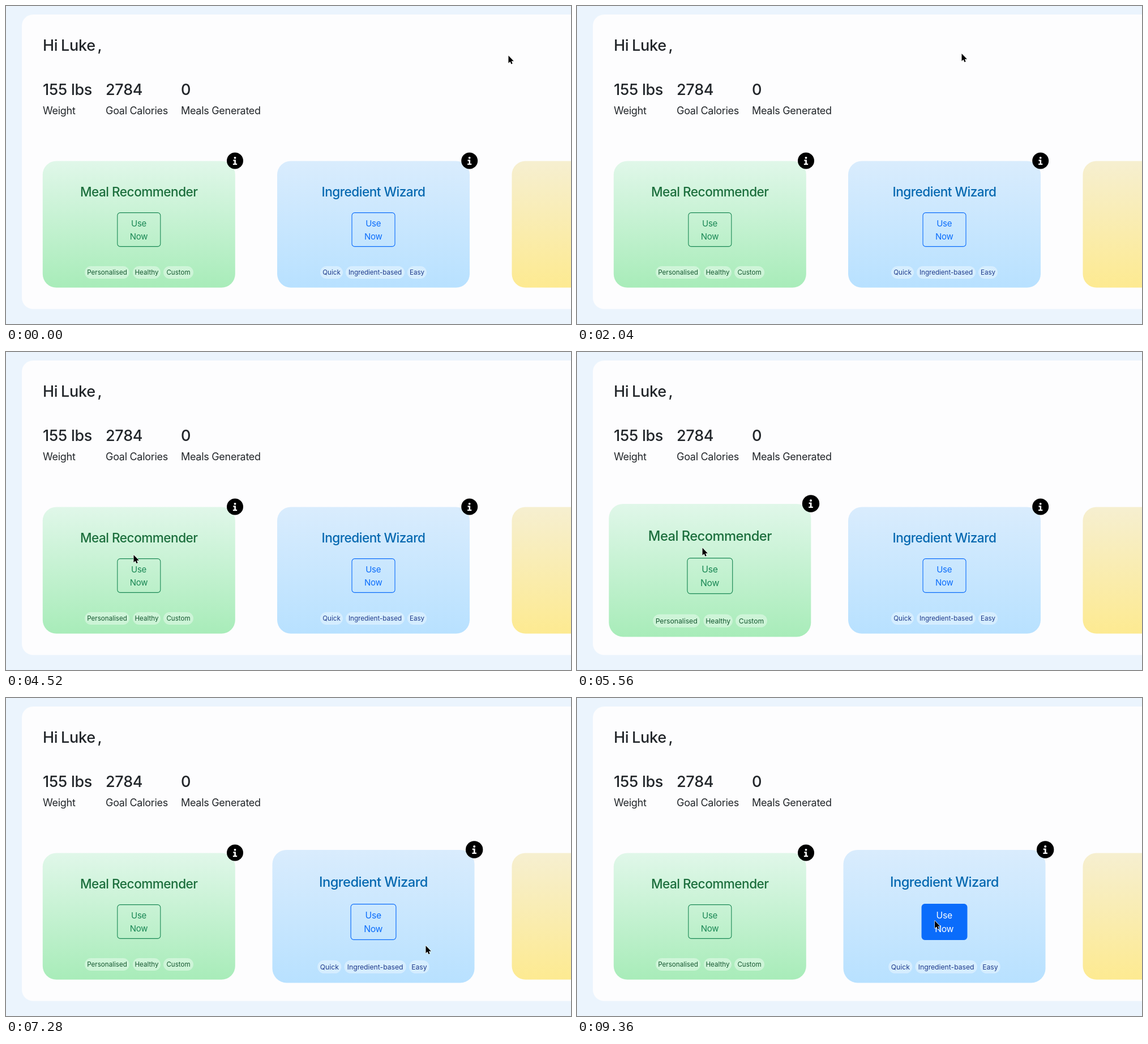
These frames come from a looping animation (998x561 px, 9.4 s). An HTML page:

```html
<!DOCTYPE html>
<html lang="en">
<head>
<meta charset="utf-8">
<title>Meal dashboard</title>
<style>
  html, body { margin: 0; width: 100%; height: 100%; overflow: hidden; background: #ebf4fd; }
  svg { display: block; width: 100%; height: 100%; }
  text { font-family: Inter, "Open Sans", sans-serif; fill: #212529; letter-spacing: -.02em; }
  .big { font-size: 27px; font-weight: 500; letter-spacing: -.01em; }
  .label { font-size: 18px; letter-spacing: -.016em; }
  .mid { text-anchor: middle; }
  .title { font-size: 22.6px; font-weight: 500; letter-spacing: -.023em; }
  .btn { font-size: 15px; }
  .tag { font-size: 11.6px; letter-spacing: 0; }
</style>
</head>
<body>
<svg id="stage" viewBox="0 0 998 561" xmlns="http://www.w3.org/2000/svg"></svg>
<script>
const LOOP = 9400, STEP = 40;
const stage = document.getElementById('stage');

const text = (x, y, cls, str, fill = '#212529') =>
  `<text x="${x}" y="${y}" class="${cls}" style="fill:${fill}">${str}</text>`;

const gradient = (id, top, bottom) =>
  `<linearGradient id="${id}" x1="0" y1="0" x2="0" y2="1">
    <stop stop-color="${top}"/><stop offset="1" stop-color="${bottom}"/></linearGradient>`;

const panel = (x, fill) =>
  `<rect x="${x}" y="273.5" width="340" height="223.3" rx="24" fill="url(#${fill})"/>`;

const infoIcon = x => `<g transform="translate(${x} 273)">
  <circle r="14.5"/>
  <g fill="#fff"><circle cy="-5.2" r="1.9"/>
  <path d="M-3.2-1.7H1.4V5.1H3.6V7.3H-3.6V5.1H-1.2V.5H-3.2Z"/></g></g>`;

const tag = ([str, left, right], color) =>
  `<rect x="${left}" y="459" width="${right - left}" height="22" rx="11" fill="#fff" fill-opacity=".38"/>` +
  text((left + right) / 2, 474.3, 'tag mid', str, color);

function card(c) {
  const cx = c.x + 170;
  return `<g id="${c.id}">${panel(c.x, c.id + 'Fill')}
    ${text(cx, 335.6, 'title mid', c.title, c.titleColor)}
    <rect class="face" x="${cx - 38}" y="364.6" width="76" height="59.8" rx="5"
      fill="${c.btn}" fill-opacity="0" stroke="${c.btn}" stroke-width="1.1"/>
    ${text(cx - .3, 389, 'btn mid', 'Use', c.btn)}
    ${text(cx - .3, 412, 'btn mid', 'Now', c.btn)}
    ${c.tags.map(t => tag(t, c.tagColor)).join('')}
    ${infoIcon(c.x + 339.7)}</g>`;
}

const green = {
  id: 'green', x: 64.8, title: 'Meal Recommender', titleColor: '#1b6e3c',
  btn: '#198754', tagColor: '#14572f',
  tags: [['Personalised', 139, 218], ['Healthy', 224, 273], ['Custom', 278, 331]]
};
const blue = {
  id: 'blue', x: 479, title: 'Ingredient Wizard', titleColor: '#0568b0',
  btn: '#0a6cfb', tagColor: '#1e3a8a',
  tags: [['Quick', 555, 595], ['Ingredient-based', 600, 704], ['Easy', 709, 743]]
};

stage.innerHTML = `<defs>
    ${gradient('greenFill', '#e0f7e9', '#a8ecb9')}
    ${gradient('blueFill', '#d9ecfd', '#b8e1ff')}
    ${gradient('yellowFill', '#f6efd0', '#fdea91')}
  </defs>
  <rect width="998" height="561" fill="#ebf4fd"/>
  <rect x="28" y="15" width="1100" height="519.5" rx="20" fill="#fdfdfe"/>
  ${text(65, 78.5, 'big', 'Hi')}
  ${text(97, 78.5, 'big', 'Luke')}
  ${text(161.5, 78.5, 'big', ',')}
  ${[[65, '155 lbs', 'Weight'], [176, '2784', 'Goal Calories'], [309, '0', 'Meals Generated']]
    .map(([x, n, l]) => text(x, 156.5, 'big', n) + text(x, 191, 'label', l)).join('')}
  ${panel(893.5, 'yellowFill')}
  ${card(green)}${card(blue)}
  <path id="cursor" d="M0 0V13.2L3 10.5L5 15L7.2 14L5.3 9.7H9.4Z"
    stroke="#fff" stroke-width="1.2" stroke-linejoin="round" paint-order="stroke"/>`;

// Pointer stops: time, x, y
const path = [
  [80, 887.5, 87.5], [960, 679.5, 84], [4180, 679.5, 84], [4520, 225.5, 358],
  [4720, 215, 345], [5500, 215, 345], [6200, 529.5, 373], [6640, 570, 448],
  [7280, 741.5, 437], [7900, 741.5, 437], [8700, 632, 393]
];

const clamp = v => Math.max(0, Math.min(1, v));
const smooth = k => k * k * (3 - 2 * k);
const settle = k => 1 - (1 - k) ** 2.2;
const ramp = (t, start, length) => settle(clamp((t - start) / length));

function pointer(t) {
  let i = 0;
  while (i < path.length - 2 && t > path[i + 1][0]) i++;
  const [t0, x0, y0] = path[i], [t1, x1, y1] = path[i + 1];
  const k = smooth(clamp((t - t0) / (t1 - t0)));
  return [x0 + (x1 - x0) * k, y0 + (y1 - y0) * k];
}

const cursor = document.getElementById('cursor');
const greenCard = document.getElementById('green');
const blueCard = document.getElementById('blue');
const face = blueCard.querySelector('.face');
const labels = blueCard.querySelectorAll('.btn');

function grow(node, cx, amount) {
  const cy = 385;
  node.setAttribute('transform',
    `translate(${cx} ${cy}) scale(${1 + .05 * amount}) translate(${-cx} ${-cy})`);
}

function draw(t) {
  grow(greenCard, green.x + 170, ramp(t, 4520, 300) - ramp(t, 5920, 300));
  grow(blueCard, blue.x + 170, ramp(t, 6000, 300));
  const fill = ramp(t, 8400, 150);
  face.setAttribute('fill-opacity', fill);
  const mix = (a, b) => Math.round(a + (b - a) * fill);
  const ink = `rgb(${mix(10, 255)},${mix(108, 255)},${mix(251, 255)})`;
  labels.forEach(l => { l.style.fill = ink; });
  cursor.setAttribute('transform', `translate(${pointer(t)})`);
}

const start = performance.now();
function tick() {
  const t = (performance.now() - start) % LOOP;
  draw(Math.floor(t / STEP) * STEP);
  requestAnimationFrame(tick);
}
tick();
</script>
</body>
</html>
```
